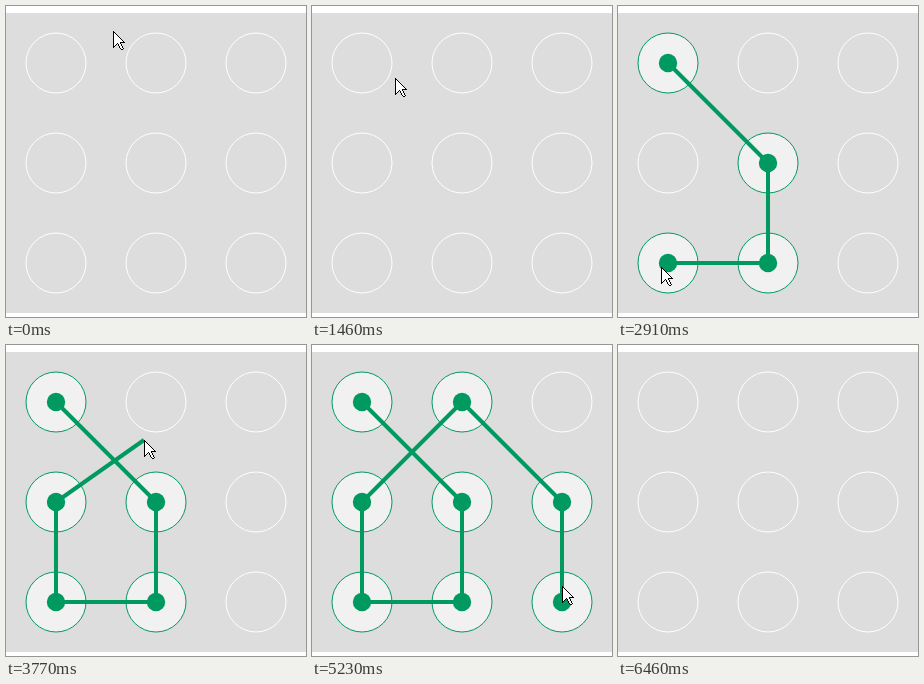
Animation of 300 by 311 pixels, one loop 7.57 s. Source, as an HTML page with a canvas:

```html
<!DOCTYPE html>
<html lang="en">
<head>
<meta charset="utf-8">
<title>Pattern lock</title>
<style>
  html, body { margin: 0; width: 100%; height: 100%; overflow: hidden; background: #fff; }
  canvas { display: block; }
</style>
</head>
<body>
<canvas id="stage" width="300" height="311"></canvas>
<script>
const ctx = document.getElementById('stage').getContext('2d');
const LOOP = 7570, TICK = 121.5;
const GREEN = '#009a61', RED = '#e03a3a', FILL = '#f1f1f1';
const RADIUS = 30, DOT = 9.2;

// Phases of the gesture, in ticks
const PRESS = 11, SHOW = 13, RELEASE = 45, RESET = 49, EXIT = 53;

// Turning points of the pointer
const turns = [
  { k: 0, x: 107, y: 25 },
  { k: 7, x: 48, y: 40 },
  { k: 10, x: 47, y: 41 },
  { k: 12, x: 83, y: 72 },
  { k: 17, x: 153, y: 165 },
  { k: 21, x: 172, y: 244 },
  { k: 24, x: 43, y: 261 },
  { k: 28, x: 51, y: 165 },
  { k: 31, x: 138, y: 95 },
  { k: 33, x: 157, y: 65 },
  { k: 36, x: 246, y: 162 },
  { k: 38, x: 254, y: 177 },
  { k: 43, x: 250, y: 241 },
  { k: 48, x: 250, y: 241 },
  { k: EXIT, x: 262, y: 312 }
];

const nodes = Array.from({ length: 9 }, (_, i) => ({
  x: 50 + i % 3 * 100,
  y: 57 + Math.floor(i / 3) * 100
}));

const easeOut = u => Math.sin(u * Math.PI / 2);
const mix = (a, b, u) => Math.round(a + (b - a) * u);

function pointerAt(k) {
  const i = turns.findIndex(p => p.k > k);
  if (i < 0) return turns[turns.length - 1];
  const a = turns[i - 1], b = turns[i];
  const u = easeOut((k - a.k) / (b.k - a.k));
  return { x: mix(a.x, b.x, u), y: mix(a.y, b.y, u) };
}

// Nodes touched so far, in order
function touchedBy(k) {
  const hits = new Set();
  if (k < SHOW || k >= RESET) return hits;
  for (let j = PRESS; j <= k; j++) {
    const p = pointerAt(j);
    const hit = nodes.find(n => Math.hypot(n.x - p.x, n.y - p.y) < RADIUS);
    if (hit) hits.add(hit);
  }
  return hits;
}

function circle(n, r) {
  ctx.beginPath();
  ctx.arc(n.x, n.y, r, 0, Math.PI * 2);
}

function drawPointer({ x, y }) {
  const bar = (row, from, to, color) => {
    ctx.fillStyle = color;
    ctx.fillRect(x + from, y + row, to - from + 1, 1);
  };
  const span = (row, from, to) => {
    bar(row, from, to, '#000');
    if (to - from > 1) bar(row, from + 1, to - 1, '#fff');
  };
  for (let row = 0; row < 17; row++) span(row, 0, row < 11 ? row : row < 12 ? 7 : 16 - row);
  bar(11, 7, 11, '#000');
  for (let row = 12; row < 18; row++) {
    const left = Math.floor((row - 3) / 2);
    span(row, left, left + 3);
  }
  bar(18, 8, 9, '#000');
}

function draw(time) {
  const k = Math.floor((time % LOOP + 6) / TICK);
  const pointer = pointerAt(k);
  const touched = touchedBy(k);
  const color = k < RELEASE ? GREEN : RED;

  ctx.fillStyle = '#fff';
  ctx.fillRect(0, 0, 300, 311);
  ctx.fillStyle = '#ddd';
  ctx.fillRect(0, 7, 300, 300);

  ctx.lineWidth = 1;
  ctx.fillStyle = FILL;
  for (const n of nodes) {
    circle(n, RADIUS);
    if (touched.has(n)) ctx.fill();
    ctx.strokeStyle = touched.has(n) ? color : '#fff';
    ctx.stroke();
  }

  if (touched.size) {
    ctx.beginPath();
    touched.forEach(n => ctx.lineTo(n.x, n.y));
    if (k < RELEASE) ctx.lineTo(pointer.x, pointer.y);
    ctx.strokeStyle = ctx.fillStyle = color;
    ctx.lineWidth = 4;
    ctx.lineJoin = 'round';
    ctx.stroke();
    touched.forEach(n => { circle(n, DOT); ctx.fill(); });
  }
  if (k < EXIT) drawPointer(pointer);
}

const start = performance.now();
function loop() {
  draw(performance.now() - start);
  requestAnimationFrame(loop);
}
loop();
</script>
</body>
</html>
```
